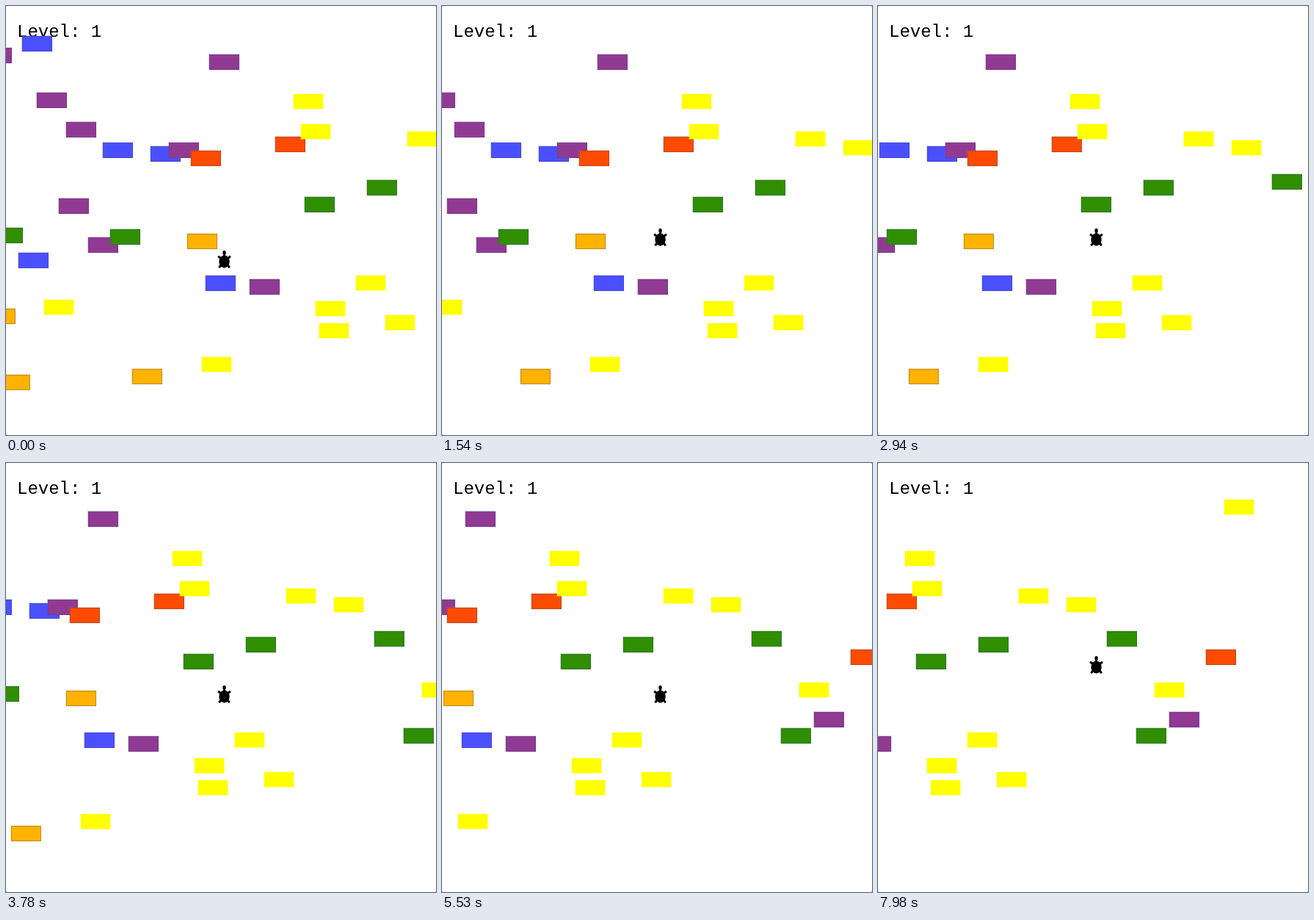
These frames come from a looping animation (586x584 px, 8000 ms). An HTML page with a canvas:

```html
<!DOCTYPE html>
<html lang="en">
<head>
<meta charset="utf-8">
<title>Turtle crossing</title>
<style>
  html, body { margin: 0; width: 100%; height: 100%; overflow: hidden; background: #fff; }
  canvas { display: block; }
</style>
</head>
<body>
<canvas id="stage" width="586" height="584"></canvas>
<script>
const ctx = document.getElementById('stage').getContext('2d');

const LOOP = 8000, TICK = 70;            // ms
const MOVE_TIME = 112, MOVE_STEP = 5;    // every car hops left together
const SPAWN_X = 597;

const COLORS = {
  blue: '#4b50ff', purple: '#913a93', red: '#ff4b00',
  green: '#2f8f00', orange: '#ffb200', yellow: '#ffff00'
};

// Centre of each car when the loop starts; those beyond SPAWN_X are still to come
const CARS = {
  purple: [[-13, 67], [62, 128], [92, 272], [102, 168], [132, 325], [242, 196], [297, 76], [352, 382], [772, 349]],
  orange: [[-8, 422], [12, 512], [192, 504], [267, 320]],
  green: [[2, 312], [162, 314], [427, 270], [512, 247], [687, 239], [727, 371]],
  blue: [[37, 346], [42, 51], [152, 196], [217, 201], [292, 377]],
  yellow: [[72, 410], [287, 488], [412, 130], [422, 171], [442, 412], [447, 442], [497, 377],
           [537, 431], [567, 181], [632, 193], [752, 309], [847, 60]],
  red: [[272, 207], [387, 188], [822, 264]]
};

// Newer cars lie on top
const cars = Object.entries(CARS)
  .flatMap(([color, spots]) => spots.map(([x, y]) => ({ color, x, y })))
  .sort((a, b) => a.x - b.x);

function drawCar(color, x, y) {
  ctx.fillStyle = COLORS[color];
  ctx.globalAlpha = 0.3;
  ctx.fillRect(x - 21, y - 11, 42, 22);
  ctx.globalAlpha = 1;
  ctx.fillRect(x - 20, y - 10, 40, 20);
  if (color === 'yellow') return;
  ctx.fillRect(x - 20, y - 10, 41, 21);
  ctx.strokeStyle = 'rgba(60, 70, 120, 0.35)';
  ctx.lineWidth = 1;
  ctx.strokeRect(x - 19.5, y - 9.5, 40, 20);
}

function line(x1, y1, x2, y2) {
  ctx.beginPath();
  ctx.moveTo(x1, y1);
  ctx.lineTo(x2, y2);
  ctx.stroke();
}

function drawTurtle(x, y) {
  ctx.save();
  ctx.translate(x, y);
  ctx.fillStyle = ctx.strokeStyle = '#000';
  ctx.lineWidth = 3;
  ctx.beginPath();
  ctx.ellipse(0, -1, 7.2, 8.5, 0, 0, 2 * Math.PI);
  ctx.fill();
  ctx.beginPath();
  ctx.ellipse(0, -13.2, 2.2, 3, 0, 0, 2 * Math.PI);
  ctx.fill();
  line(0, -13, 0, -8);
  for (const side of [-1, 1]) {
    line(side * 4, -5, side * 8.4, -8.2);
    line(side * 4, 3, side * 7.2, 7.2);
  }
  ctx.restore();
}

function drawCorners() {
  ctx.fillStyle = '#b4b4b4';
  for (const x of [0, 585]) for (const y of [0, 583]) ctx.fillRect(x, y, 1, 1);
}

// Hops made so far in a burst of evenly spaced key presses
function hops(time, first, interval, count) {
  const made = Math.floor((time - first) / interval) + 1;
  return Math.max(0, Math.min(count, made));
}

function draw(now) {
  const time = Math.floor(now % LOOP / TICK) * TICK;
  const shift = Math.floor(time / MOVE_TIME + 0.06) * MOVE_STEP;

  ctx.fillStyle = '#fff';
  ctx.fillRect(0, 0, 586, 584);
  drawCorners();

  ctx.fillStyle = '#000';
  ctx.font = '24px Courier, "Liberation Mono", monospace';
  ctx.fillText('Level: 1', 15, 42);

  for (const { color, x, y } of cars) {
    if (x - shift < SPAWN_X) drawCar(color, x - shift, y);
  }
  drawTurtle(297.5, 349 - 10 * (hops(time, 140, 210, 3) + hops(time, 6230, 490, 4)));
}

let start;
function frame(now) {
  start ??= now;
  draw(now - start);
  requestAnimationFrame(frame);
}
draw(0);
requestAnimationFrame(frame);
</script>
</body>
</html>
```
